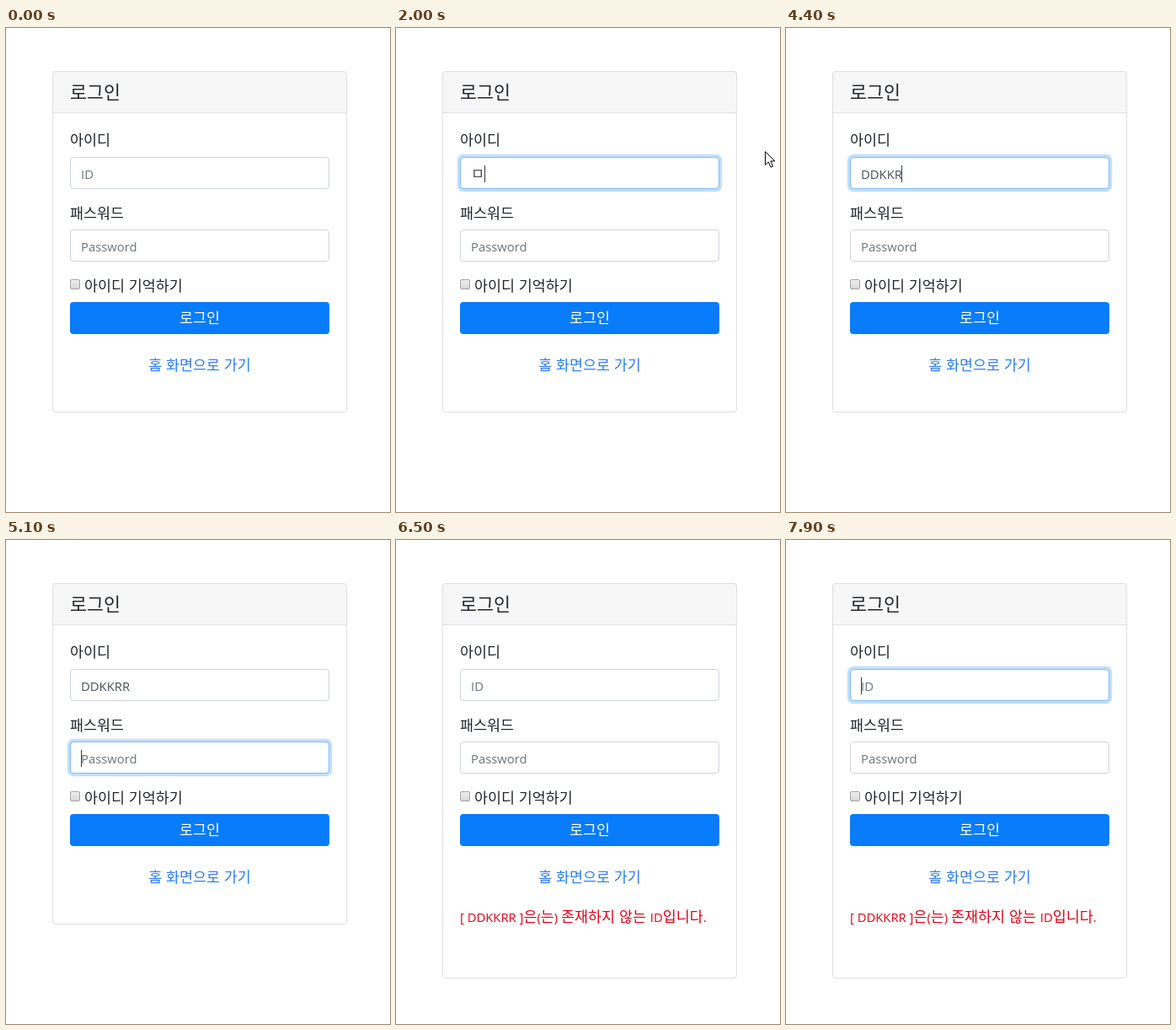
An HTML page that plays this animation: 456 by 574 pixels, repeating every 8 s.

```html
<!DOCTYPE html>
<html lang="ko">
<head>
<meta charset="utf-8">
<title>로그인</title>
<style>
  html, body { margin: 0; width: 100%; height: 100%; overflow: hidden; background: #fff; }
  svg { display: block; width: 456px; height: 574px; }
  text { font: 350 17.4px "Noto Sans CJK KR", "Noto Sans CJK", sans-serif; fill: #212529; }
  .title { font-size: 21.7px; }
  .mid { text-anchor: middle; }
  .en { font: 400 14.8px "Open Sans", "Noto Sans", sans-serif; }
  .dots { font: 400 17.6px "Open Sans", "Noto Sans", sans-serif; }
  .value { fill: #495057; }
  .hint { fill: #6c757d; }
  .line { fill: none; stroke: #dfdfdf; }
  .box { fill: #fff; stroke: #ced4da; }
  .glow { fill: none; }
  .glow .ring { stroke: #007bff; stroke-opacity: .25; stroke-width: 3.2; }
  .glow .edge { stroke: #80bdff; }
  .caret { fill: #343a40; }
  #alert { fill: #e60012; }
  #cursors path { fill: #fff; stroke: #000; stroke-linejoin: round; }
  #cursors #beam { fill: none; stroke: #333; }
</style>
</head>
<body>
<svg viewBox="0 0 456 574">
  <defs>
    <linearGradient id="shade" x2="0" y2="1">
      <stop stop-color="#f0f0f0"/><stop offset="1" stop-color="#d6d6d6"/>
    </linearGradient>
  </defs>

  <path d="M56 100V55q0-3 3-3H401q3 0 3 3V100z" fill="#f7f7f7"/>
  <path class="line" d="M56 100.5H404"/>
  <rect id="card" class="line" x="55.5" y="51.5" width="349" height="404" rx="3.5"/>
  <text class="title" x="76" y="84">로그인</text>

  <text x="76" y="139">아이디</text>
  <g id="user"></g>
  <text x="76" y="225.5">패스워드</text>
  <g id="pass"></g>

  <rect x="76.5" y="298.5" width="11" height="11" rx="1.5" fill="url(#shade)" stroke="#a3a3a3"/>
  <text x="93" y="311.5">아이디 기억하기</text>

  <rect id="button" x="76" y="325" width="308" height="38" rx="4"/>
  <text class="mid" x="230" y="350" style="fill:#fff">로그인</text>
  <text class="mid" x="230" y="405.5" style="fill:#2a7df2">홈 화면으로 가기</text>
  <text id="alert" x="76" y="453"><tspan class="en">[ DDKKRR ]</tspan>은<tspan class="en">(</tspan>는<tspan class="en">) </tspan>존재하지 않는 <tspan class="en">ID</tspan>입니다<tspan class="en">.</tspan></text>

  <g id="cursors">
    <path id="arrow" d="M.5 .5v16l3.8-3.6 2.7 6.2 2.6-1.1-2.7-6.1h5z"/>
    <path id="beam" d="M-3.5-7.5h2.5l1.5 1 1.5-1h2.5M-3.5 7.5h2.5l1.5-1 1.5 1h2.5M.5-6.5v13"/>
    <path id="hand" d="M-1.5 2c0-2 3-2 3 0v7c.3-1.6 3-1.4 3 .4c.4-1.2 2.8-1 2.8 .7c.5-.9 2.6-.6 2.6 1.2v5c0 3-2 3.5-2 6.2h-8.4c0-2.5-2.4-4-3.4-6.2l-2.4-4.3c-.6-1.6 1.3-2.6 2.5-1.2l2.3 2.3z"/>
  </g>
</svg>

<script>
const LOOP = 8000, TICK = 100, FADE = 150, RELOAD = 6500;
const $ = id => document.getElementById(id);
const clamp = v => Math.max(0, Math.min(1, v));

function makeField(id, top, hint) {
  const g = $(id);
  g.innerHTML = `
    <rect class="box" x="76.5" y="${top + .5}" width="307" height="37" rx="3.5"/>
    <g class="glow">
      <rect class="ring" x="74.4" y="${top - 1.6}" width="311.2" height="41.2" rx="5.6"/>
      <rect class="edge" x="76.5" y="${top + .5}" width="307" height="37" rx="3.5"/>
    </g>
    <text x="89" y="${top + 26}"></text>
    <rect class="caret" y="${top + 10}" width="1" height="20"/>`;
  const text = g.querySelector("text");
  const caret = g.querySelector(".caret");
  const glow = g.querySelector(".glow");
  return (value, kind, focus, active) => {
    text.textContent = value;
    text.setAttribute("class", kind + " value");
    const width = value ? text.getComputedTextLength() : 0;
    if (!value) {
      text.textContent = hint;
      text.setAttribute("class", "en hint");
    }
    caret.setAttribute("x", Math.floor(89 + width));
    caret.style.display = active ? "" : "none";
    glow.style.opacity = focus;
  };
}

const drawUser = makeField("user", 153, "ID");
const drawPass = makeField("pass", 239, "Password");

// Focus spans, and the moments at which each key lands
const userFocus = [[1250, 4930], [7550, 9000]];
const passFocus = [[4930, 6350]];
const jamo = [[1900, 1], [2100, 2], [2700, 1], [3000, 0]];
const name = "DDKKRR";
const nameKeys = [3300, 3600, 3900, 4100, 4300, 4500];
const passKeys = [5200, 5400, 5700, 5900, 6000];

// Pointer visits: time, x, y
const visits = [
  [[100, 426, 457], [300, 418, 410], [500, 405, 340], [700, 370, 295],
   [900, 285, 258], [1000, 266, 222], [1100, 261, 192], [1300, 250, 178],
   [1700, 250, 178], [1800, 285, 172], [1900, 360, 164], [2000, 438, 146]],
  [[5900, 380, 470], [6000, 350, 405], [6100, 323, 343], [6300, 323, 343], [6400, 355, 410]]
];

const typed = (keys, t) => keys.filter(k => t >= k).length;
const isActive = (spans, t) => spans.some(([a, b]) => t >= a && t < b);
const focusLevel = (spans, t) =>
  Math.max(...spans.map(([a, b]) => clamp(Math.min((t - a) / FADE, 1 - (t - b) / FADE))));

function pointerAt(t) {
  const path = visits.find(v => t >= v[0][0] && t <= v[v.length - 1][0]);
  if (!path) return null;
  const i = Math.max(1, path.findIndex(p => p[0] >= t));
  const [a, b] = [path[i - 1], path[i]];
  const k = (t - a[0]) / (b[0] - a[0]);
  return { x: Math.round(a[1] + (b[1] - a[1]) * k), y: Math.round(a[2] + (b[2] - a[2]) * k) };
}

function shapeAt({ x, y }) {
  if (x < 76 || x > 384) return "arrow";
  if ((y >= 153 && y <= 192) || (y >= 239 && y <= 277)) return "beam";
  return y >= 325 && y < 363 ? "hand" : "arrow";
}

function drawPointer(t) {
  const p = pointerAt(t);
  const shape = p && shapeAt(p);
  for (const id of ["arrow", "beam", "hand"]) $(id).style.display = id === shape ? "" : "none";
  if (p) $("cursors").setAttribute("transform", `translate(${p.x} ${p.y})`);
  $("button").style.fill = shape === "hand" ? "#0069d9" : "#087cfa";
}

function draw(t) {
  const done = t >= RELOAD;
  const early = jamo.filter(s => t >= s[0]).pop();
  const latin = name.slice(0, typed(nameKeys, t));
  const userText = done ? "" : latin || "ㅁ".repeat(early ? early[1] : 0);
  const passText = done ? "" : "•".repeat(typed(passKeys, t));

  drawUser(userText, latin ? "en" : "ko", focusLevel(userFocus, t), isActive(userFocus, t));
  drawPass(passText, "dots", focusLevel(passFocus, t), isActive(passFocus, t));
  $("card").setAttribute("height", done ? 468 : 404);
  $("alert").style.display = done ? "" : "none";
  drawPointer(t);
}

const start = performance.now();
let last = -1;
function loop() {
  const t = Math.floor(((performance.now() - start) % LOOP) / TICK) * TICK;
  if (t !== last) draw(last = t);
  requestAnimationFrame(loop);
}
loop();
</script>
</body>
</html>
```
